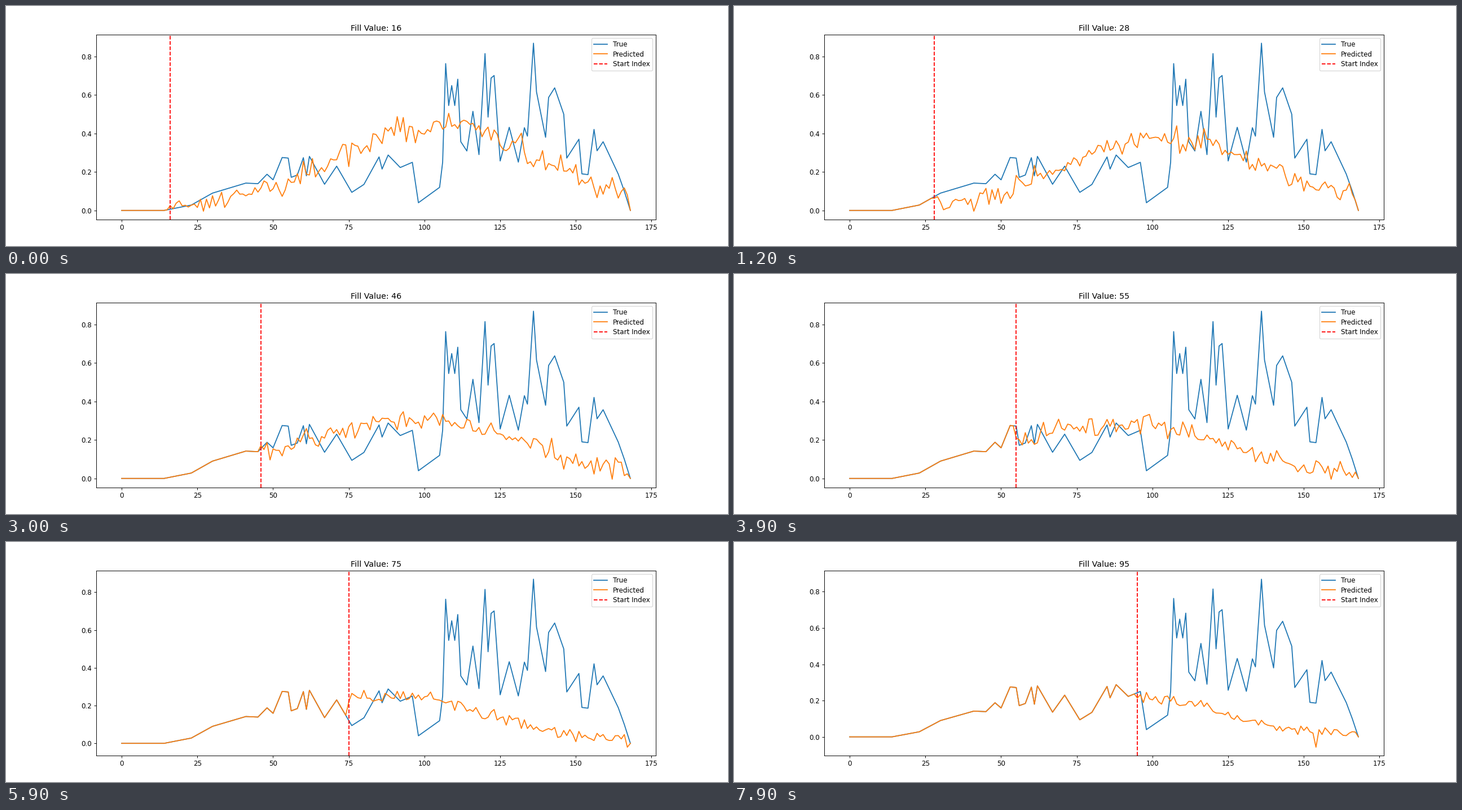
A matplotlib script that plays this animation: 1280 by 427 pixels, repeating every 8 s.

```python
import numpy as np
import matplotlib.pyplot as plt
from matplotlib.animation import FuncAnimation

FIRST, FRAMES, LAST = 16, 80, 168
DPI = 256 / 3

# Turning points of the measured series: index -> value
TURNS = {
    14: 0, 23: .028, 30: .09, 41: .142, 45: .139, 48: .188, 50: .159,
    53: .275, 55: .272, 56: .172, 58: .184, 60: .274, 61: .18, 62: .281,
    67: .136, 71: .23, 76: .094, 80: .135, 85: .278, 86: .215, 88: .288,
    92: .223, 96: .25, 98: .04, 105: .12, 106: .25, 107: .763, 108: .545,
    109: .649, 110: .545, 111: .682, 112: .357, 114: .309, 116: .515,
    118: .29, 120: .815, 121: .485, 122: .688, 123: .701, 125: .257,
    128: .432, 131: .251, 133: .43, 134: .386, 136: .869, 137: .616,
    140: .38, 141: .587, 143: .637, 146: .5, 147: .272, 151: .37,
    152: .19, 154: .186, 156: .421, 157: .31, 159: .357, 164: .189,
    166: .1, LAST: 0,
}

x = np.arange(LAST + 1)
true = np.interp(x, list(TURNS), list(TURNS.values()))


def hump(start):
    """Lopsided bell that gets lower and moves left as start grows."""
    height = .19 + .26 * np.exp((FIRST - start) / 38)
    centre = np.interp(start, [36, 60], [106, 90])
    left = np.interp(start, [28, 55], [34, 46])
    width = np.where(x < centre, left, 32.5)
    return height * np.exp(-((x - centre) / width) ** 2 / 2)


def predict(start):
    """Return the predicted series and its lowest value."""
    rng = np.random.default_rng(start)
    spread = np.interp(start, [16, 95], [.033, .015])
    floor = np.interp(start, [66, 95], [-.004, -.057])
    noisy = hump(start) + rng.normal(0, spread, x.size)
    noisy = floor + abs(noisy - floor)
    noisy[start + noisy[start:-1].argmin()] = floor
    noisy[-1] = 0
    return np.where(x < start, true, noisy), floor


fig, ax = plt.subplots(figsize=(15, 5.004), dpi=DPI)
ax.plot(x, true, label="True")
pred_line, = ax.plot(x, true, label="Predicted")
start_line = ax.axvline(FIRST, color="r", linestyle="--", label="Start Index")
title = ax.set_title("")
ax.set_xlim(-.05 * LAST, 1.05 * LAST)
ax.legend(loc="upper right", labelspacing=.4)


def update(i):
    start = FIRST + i
    pred, low = predict(start)
    top = true.max()
    margin = .05 * (top - low)
    pred_line.set_ydata(pred)
    start_line.set_xdata([start, start])
    ax.set_ylim(low - margin, top + margin)
    title.set_text(f"Fill Value: {start}")
    return pred_line, start_line, title


anim = FuncAnimation(fig, update, frames=FRAMES, interval=100,
                     init_func=lambda: update(0), repeat=True)
plt.show()
```
